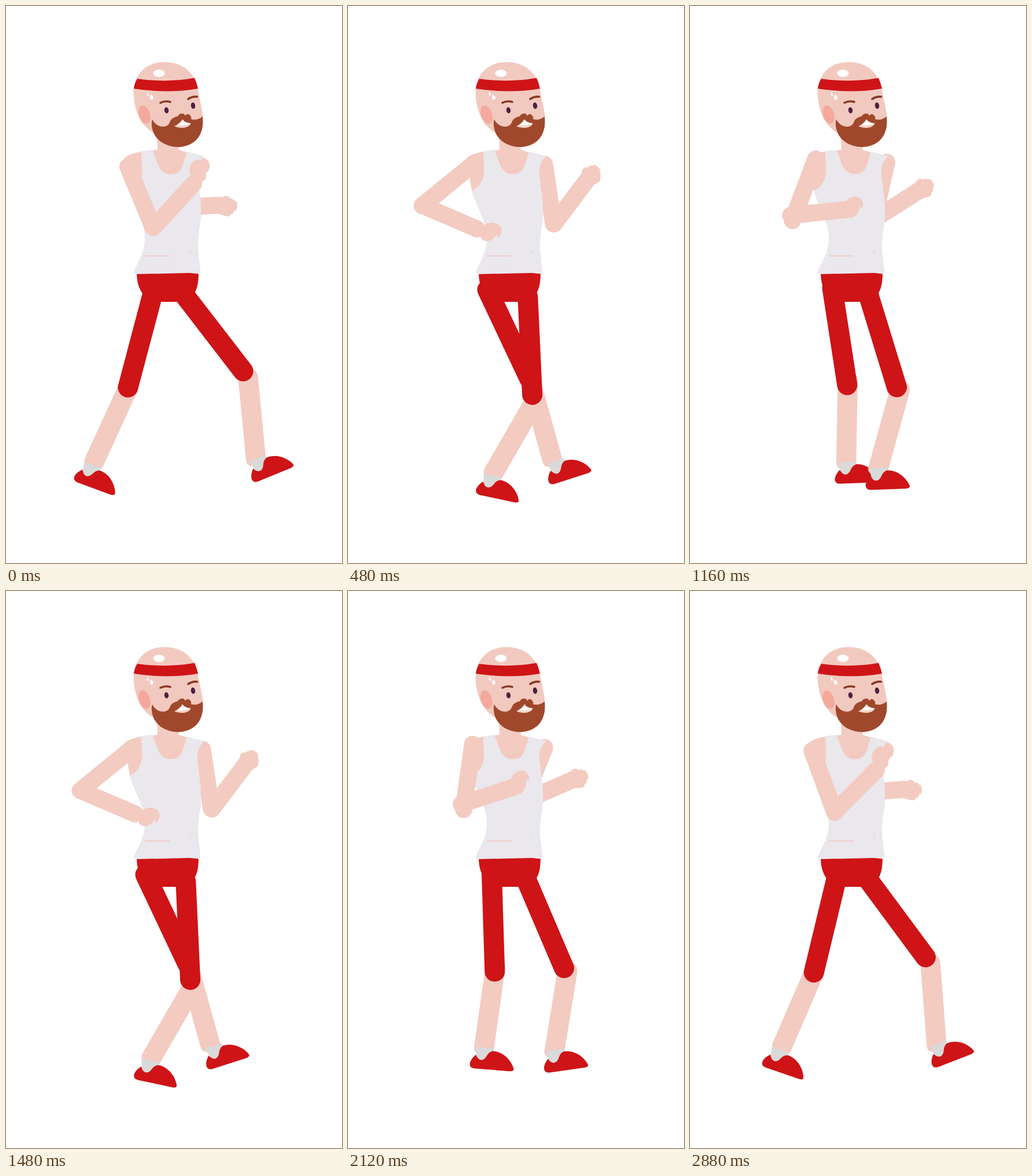
Write an HTML page without scripts that moves like this. It is 581 px wide and 964 px high and loops after 2920 ms.

```html
<!DOCTYPE html>
<html lang="en">
<head>
<meta charset="utf-8">
<title>Walking man</title>
<style>
  @property --k { syntax: "<number>"; inherits: true; initial-value: 0; }

  html, body { margin: 0; width: 100%; height: 100%; overflow: hidden; background: #fff; }
  svg { display: block; width: 100%; height: 100%; animation: stride 2920ms infinite; }

  /* --k swings 0 to 1 and back, 500 ms each way; the last swing is cut short */
  @keyframes stride {
    0%, 34.2466%, 68.4932% { --k: 0; animation-timing-function: cubic-bezier(.25, 0, .16, 1); }
    17.1233%, 51.3699% { --k: 1; animation-timing-function: cubic-bezier(.25, 0, .16, 1); }
    85.6164% { --k: 1; animation-timing-function: cubic-bezier(.277, 0, .203, .88); }
    100% { --k: .0134; }
  }

  /* x, y, r: first pose; u, v, w: change towards the second pose */
  .part {
    transform:
      translate(calc((var(--x) + var(--k) * var(--u)) * 1px), calc((var(--y) + var(--k) * var(--v)) * 1px))
      rotate(calc((var(--r) + var(--k) * var(--w)) * 1deg));
  }
  .skin { fill: #f3cbc1; }
  .red { fill: #ce1417; }
  .limb { fill: none; stroke: #f3cbc1; stroke-width: 29.5; stroke-linecap: round; }
  .thigh { fill: none; stroke: #ce1417; stroke-width: 35; stroke-linecap: round; }
  .brow { fill: none; stroke: #8a3826; stroke-width: 3.6; stroke-linecap: round; }
  .crease { fill: none; stroke: #f0c3b9; stroke-width: 1.3; stroke-linecap: round; }
</style>
</head>
<body>
<svg viewBox="0 0 581 964" preserveAspectRatio="none">
  <defs>
    <path id="thigh" class="thigh" d="M0 -85V85"/>
    <path id="shin" class="skin" d="M-17.200 -67A17.200 17.200 0 0 1 17.200 -67V75Q17 86 7 86H-7Q-17 86 -17.200 75Z"/>
    <g id="foot">
      <path fill="#d9dad9" d="M-33 -20L-3 -22L0 -14L-14 4H-26Z"/>
      <path class="red" d="M-30 -7Q-26 1 -20 1Q-14 0 -11 -8Q-8 -15 -2 -17C10 -18 22 -12 30 -3Q36 4 38 10Q38 13 32 14L-30 17Q-39 17 -38.500 8Q-37 0 -30 -7Z"/>
    </g>
  </defs>

  <!-- far arm -->
  <path class="part limb" style="--x:302;--y:315;--r:43;--u:45.5;--v:10.5;--w:-51.6" d="M0 -52V52"/>
  <path class="part limb" style="--x:325;--y:347;--r:-3;--u:60;--v:-8;--w:-50" d="M-48 0H44"/>
  <path class="part skin" style="--x:383;--y:347;--r:0;--u:39;--v:-55;--w:-50"
    d="M-17 -15L-8 -16Q-6 -19 -1 -18Q3 -18 4 -14Q10 -14 12 -10Q17 -9 16 -5Q18 -1 16 4Q14 8 11 8Q11 13 6 13Q4 18 -2 17L-17 12Z"/>

  <!-- back leg -->
  <use href="#shin" class="part" style="--x:184;--y:720;--r:24.6;--u:149;--v:-8;--w:-40.1"/>
  <use href="#foot" class="part" style="--x:157.5;--y:820.5;--r:23;--u:224;--v:-17.5;--w:-38"/>
  <use href="#thigh" class="part" style="--x:232.7;--y:577.8;--r:14.8;--u:44.6;--v:-10;--w:-40.1"/>

  <!-- front leg -->
  <use href="#shin" class="part" style="--x:425;--y:710;--r:-5.5;--u:-136;--v:33;--w:35.5"/>
  <use href="#foot" class="part" style="--x:458;--y:797;--r:-19.5;--u:-197;--v:40.5;--w:34.5"/>
  <use href="#thigh" class="part" style="--x:358.2;--y:564.7;--r:-37.6;--u:-43.5;--v:23.3;--w:35"/>

  <!-- body -->
  <path class="red" d="M226 460H333C333 478 331 488 326 497L314 512H243L237 499C229 488 226 476 226 460Z"/>
  <path class="skin" d="M261 212L262 249L234 252Q215 255 205 263L214 320L290 330L331 300L340 262L299 249L298 212Z"/>
  <path fill="#eae7ed" d="M234 251L253 249C262 268 263 291 285 291C306 291 305 274 313 252L343 260C333 268 330 280 331 292L335 325Q339 352 336 376Q330 410 333 430L336 457Q337 463 332 463.500L318 462L226 464Q219 463 222 457C232 436 240 424 240 402C240 372 223 350 214 320C232 311 237 293 235 276Z"/>
  <path class="crease" d="M276 287Q290 287 298 278M241 432.500H282"/>
  <path fill="#fff" stroke="#c9c6cb" stroke-width=".6" d="M318.500 423Q321 426 319 429Q317.500 427 318.500 423Z"/>

  <!-- head -->
  <path fill="#f2c9bf" d="M220.500 152C220 117 244 97 274 97C304 97 325 114 331 140L340 186V212H300L262 223C237 212 223 190 220.500 152Z"/>
  <ellipse cx="264.500" cy="116.500" rx="10" ry="6.500" fill="#fff"/>
  <path class="red" d="M227 126Q279 133 326 124.500Q330 133 332 143Q279 152 221 143Q222 134 227 126Z"/>
  <path fill="#fff" d="M250 153Q256 157 255 160Q253 164 250 161.500Q248 159 250 153ZM244 149Q248 152 247 154.500Q245 156.500 243.500 154Z"/>
  <ellipse cx="239.500" cy="188" rx="9.500" ry="16.500" fill="#f5a99d" transform="rotate(-18 239.500 188)"/>
  <path class="brow" d="M267 167.500Q275 163.500 284 166M315 161Q322 156 330.500 157"/>
  <ellipse cx="277.500" cy="180.500" rx="3.700" ry="5.300" fill="#4b2144" transform="rotate(-8 277.500 180.500)"/>
  <ellipse cx="323.500" cy="172.500" rx="3.700" ry="5.500" fill="#4b2144" transform="rotate(-8 323.500 172.500)"/>
  <path fill="#a0482b" d="M253 196C257 206 270 213 280 206C284 203 283 197 289 194Q293 191 297 191Q299 186 306 186Q309 187 310 190Q314 184 319 190Q321 193 320 196Q331 199 340 191C344 226 324 244 296 244C268 243 250 224 252 200Z"/>
  <path fill="#f6d3c9" d="M291 208Q300 204 305 196Q310 203 320 203Q316 211 304 211Q297 211 291 208Z"/>
  <path fill="#fff" d="M296 206Q303 202 305 196.500Q310 203 319 203Q311 208 296 206Z"/>

  <!-- near arm -->
  <path class="part limb" style="--x:232.5;--y:330.5;--r:-22.5;--u:-60;--v:-21;--w:73.4" d="M0 -57V57"/>
  <path class="part limb" style="--x:290.5;--y:344.5;--r:-47.5;--u:-113.5;--v:21.5;--w:70.8" d="M-50 0H50"/>
  <path class="part skin" style="--x:333;--y:284;--r:-43;--u:-85;--v:107;--w:71"
    d="M-16 2C-17 -9 -9 -16 3 -17C13 -17 17 -8 16 0Q15 4 12 2L10 -1Q10 10 3 16Q-3 21 -9 19L-16 14Z"/>
</svg>
</body>
</html>
```
